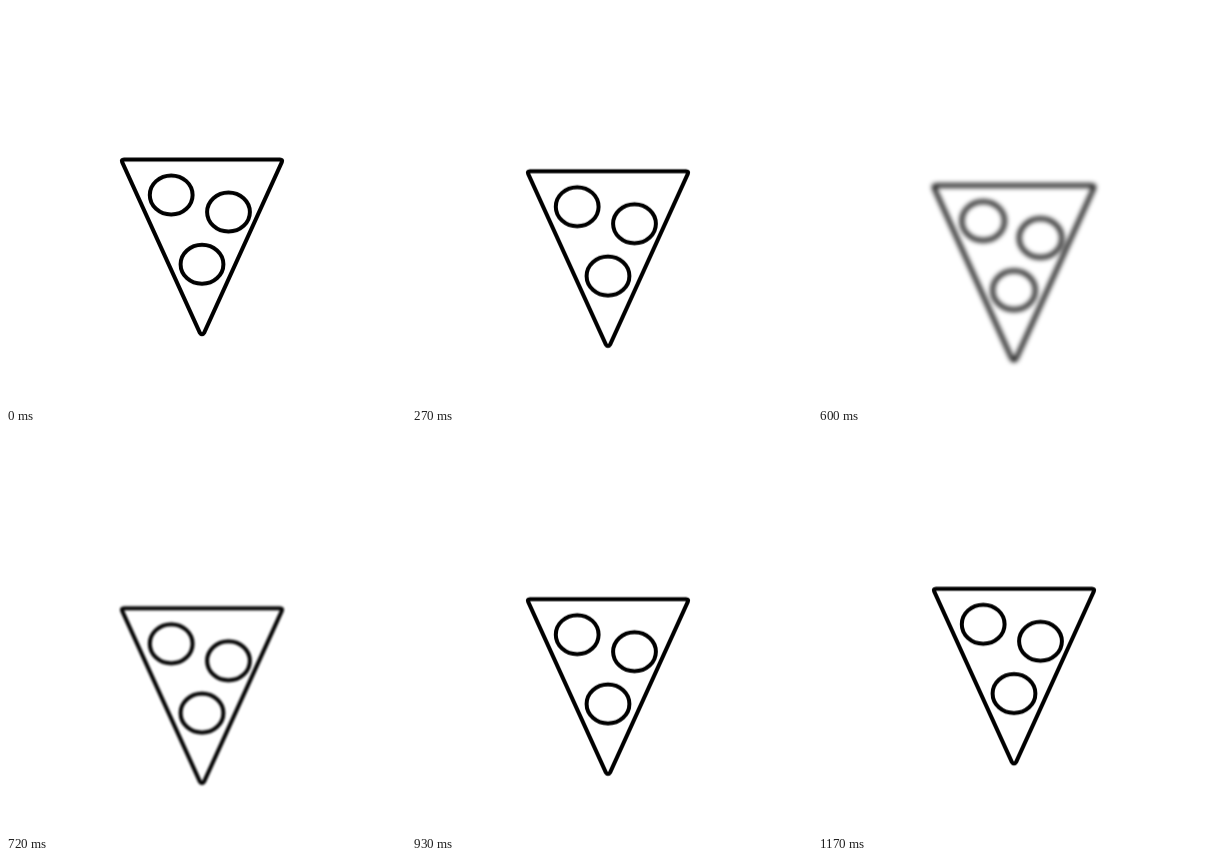
An HTML page that plays this animation: 400 px wide and 400 px high, repeating every 1200 ms.

```html
<!DOCTYPE html>
<html lang="en">
<head>
<meta charset="utf-8">
<title>Pizza slice</title>
<style>
  html, body {
    margin: 0;
    width: 100%;
    height: 100%;
    overflow: hidden;
    background: #fff;
  }
  svg {
    display: block;
    width: 400px;
    height: 400px;
    animation: soften 1200ms linear infinite;
  }
  .slice {
    fill: none;
    stroke: #000;
    stroke-width: 4;
    stroke-linejoin: round;
    animation: bob 1200ms linear infinite;
  }
  @keyframes bob {
    50% { transform: translateY(26px); }
  }
  @keyframes soften {
    0%, 21.5% { filter: blur(0); }
    38% { filter: blur(2.5px); }
    44% { filter: blur(2.7px); }
    50% { filter: blur(2.5px); }
    67.5%, 100% { filter: blur(0); }
  }
</style>
</head>
<body>
<svg viewBox="0 0 400 400">
  <g class="slice">
    <path d="M118 153.4H274Q277 153.4 275.8 156.2L198.2 326.6Q196 330 193.8 326.6L116.2 156.2Q115 153.4 118 153.4Z"/>
    <ellipse cx="165.2" cy="188.9" rx="21.4" ry="19.5"/>
    <ellipse cx="222.5" cy="206" rx="21.4" ry="19.5"/>
    <ellipse cx="196" cy="258.2" rx="21.4" ry="19.5"/>
  </g>
</svg>
</body>
</html>
```
